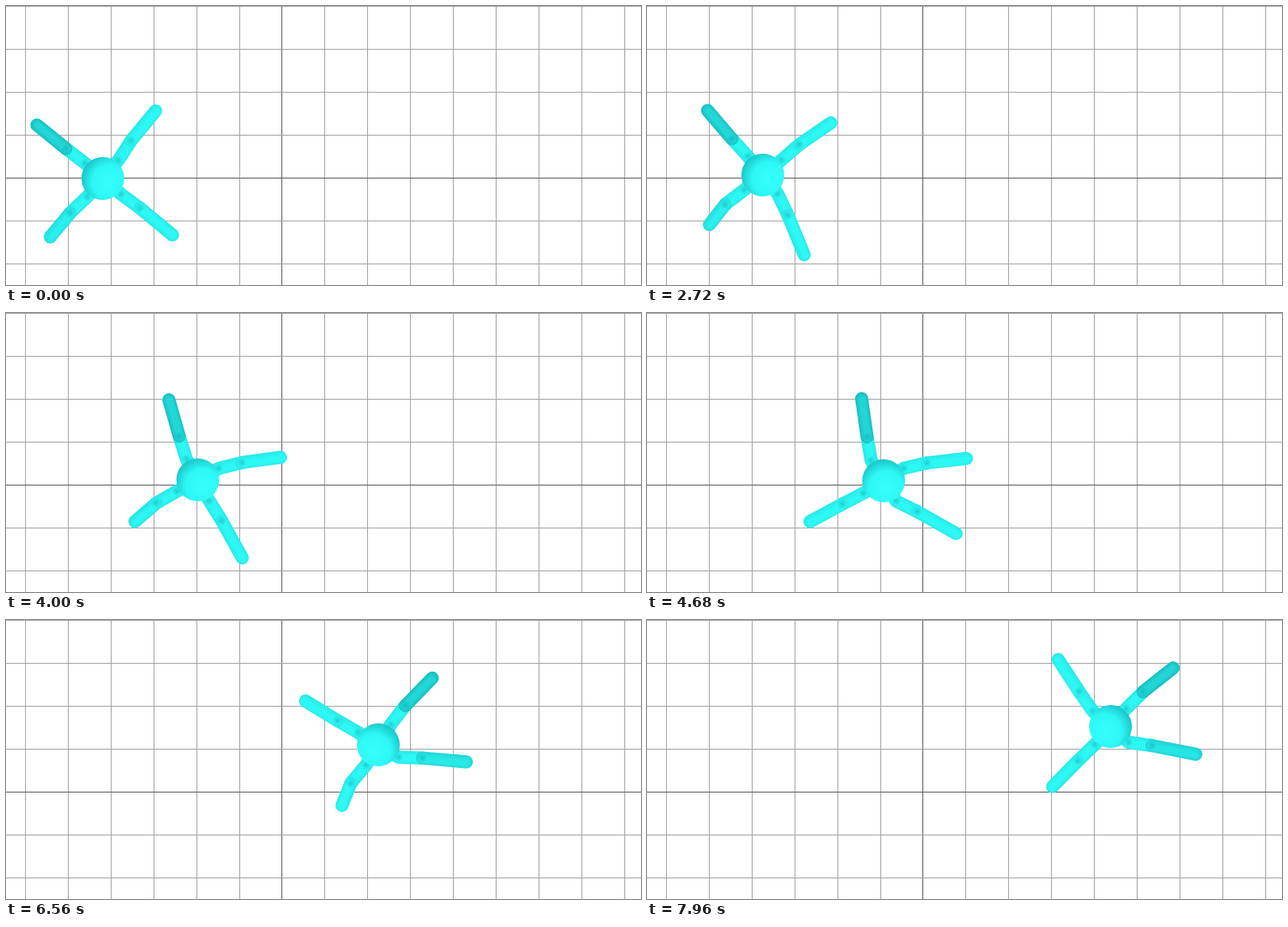
An HTML page that plays this animation: 800 px wide and 351 px high, repeating every 8000 ms.

```html
<!DOCTYPE html>
<html lang="en">
<head>
<meta charset="utf-8">
<title>Walking ant</title>
<style>
html, body { margin: 0; width: 100%; height: 100%; overflow: hidden; background: #fff; }
svg { display: block; width: 100%; height: 100%; }
polyline { fill: none; stroke-linecap: round; stroke-linejoin: round; }
</style>
</head>
<body>
<svg viewBox="0 0 800 351">
  <defs>
    <radialGradient id="ball" r=".72">
      <stop offset="0" stop-color="#32fffb"/>
      <stop offset=".55" stop-color="#2ef8f5"/>
      <stop offset="1" stop-color="#17bcbe"/>
    </radialGradient>
    <radialGradient id="dent">
      <stop offset="0" stop-color="#0ca6aa" stop-opacity=".5"/>
      <stop offset="1" stop-color="#0ca6aa" stop-opacity="0"/>
    </radialGradient>
  </defs>
  <g id="grid" shape-rendering="crispEdges"></g>
  <g id="legs"></g>
  <circle id="torso" r="27" fill="url(#ball)"/>
</svg>
<script>
const LOOP = 8000, HIP = 30, THIGH = 30, RAD = Math.PI / 180;
const LAMP = { x: 340, y: 330 };

// Key poses: body position, leg headings in degrees, reach of the rear left leg
const poses = [
  { t: 2080, x: 122, y: 217, head: [219, 308, 39, 132], reach: 99 },
  { t: 3320, x: 188, y: 208, head: [243, 340, 36, 144], reach: 86 },
  { t: 4680, x: 298, y: 211, head: [255, 345, 36, 151], reach: 106 },
  { t: 5680, x: 368, y: 197, head: [260, 342, 43, 175], reach: 108 },
  { t: 6560, x: 469, y: 157, head: [211, 309, 11, 121], reach: 89 },
  { t: 7960, x: 584, y: 134, head: [232, 317, 18, 134], reach: 105 }
].map(p => ({ t: p.t, v: [p.x, p.y, p.reach, ...p.head] }));

const byId = id => document.getElementById(id);
function set(el, attrs) {
  for (const key in attrs) el.setAttribute(key, attrs[key]);
}
function add(parent, name, attrs) {
  const el = document.createElementNS('http://www.w3.org/2000/svg', name);
  set(el, attrs);
  return parent.appendChild(el);
}

function gridLine(x, y, width, height, axis) {
  add(byId('grid'), 'rect', { x, y, width, height, fill: axis ? '#555' : '#a0a0a0' });
}
for (let i = 0; i < 15; i++) gridLine(Math.floor(24.69 + 53.88 * i), 0, 1, 351, i === 6);
for (let i = 0; i < 7; i++) gridLine(0, 54 * i, 800, 1, i === 4);

// Limb layers: stroke width and shift towards the lamp
const layers = [{ width: 16.5, shift: 0 }, { width: 12.5, shift: .9 }, { width: 8, shift: 1.6 }];
const limb = g => layers.map(l => add(g, 'polyline', { 'stroke-width': l.width }));
const legs = [
  { base: 225, reach: 107, bend: -1 },
  { base: 315, reach: 108, bend: -4 },
  { base: 45, reach: 113, bend: -2 },
  { base: 135 }
].map(leg => {
  const g = add(byId('legs'), 'g', {});
  return {
    ...leg, upper: limb(g), lower: limb(g),
    dents: [6, 6].map(r => add(g, 'circle', { r, fill: 'url(#dent)' }))
  };
});

function slope(i, k) {
  if (i === 0) return 0;
  const a = poses[i - 1], b = poses[Math.min(i + 1, poses.length - 1)];
  return (b.v[k] - a.v[k]) / (b.t - a.t);
}

// Smooth curve through the key poses
function poseAt(time) {
  const t = Math.min(Math.max(time, poses[0].t), poses[poses.length - 1].t);
  const i = Math.max(1, poses.findIndex(p => p.t >= t)) - 1;
  const a = poses[i], b = poses[i + 1], d = b.t - a.t, u = (t - a.t) / d;
  const s = u * u * (3 - 2 * u), inA = u * (1 - u) ** 2, inB = u * u * (u - 1);
  const [x, y, reach, ...head] = a.v.map((p, k) =>
    p + (b.v[k] - p) * s + d * (inA * slope(i, k) + inB * slope(i + 1, k)));
  head[2] += 25 * Math.sin(Math.PI * u) ** 2; // the rear right leg kicks once per stride
  return { x, y, reach, head };
}

function tone(dark, layer) {
  const n = dark * (1 - layer * .1) + (2 - layer) * .06;
  const mix = (from, to) => Math.round(from + (to - from) * n);
  return `rgb(${mix(48, 14)},${mix(254, 160)},${mix(250, 164)})`;
}

function paint(lines, points, dark, lx, ly) {
  lines.forEach((line, i) => {
    const { shift } = layers[i];
    set(line, {
      points: points.map(([x, y]) => `${(x + lx * shift).toFixed(2)},${(y + ly * shift).toFixed(2)}`).join(' '),
      stroke: tone(dark, i)
    });
  });
}

const step = ([x, y], angle, len) => [x + Math.cos(angle * RAD) * len, y + Math.sin(angle * RAD) * len];

function draw(time) {
  const { x, y, reach, head } = poseAt(time);
  const yaw = legs.reduce((sum, leg, i) => sum + head[i] - leg.base, 0) * .2;
  const far = Math.hypot(LAMP.x - x, LAMP.y - y);
  const lx = (LAMP.x - x) / far, ly = (LAMP.y - y) / far;

  legs.forEach((leg, i) => {
    const hip = step([x, y], leg.base + yaw, HIP);
    const foot = step([x, y], head[i], leg.reach || reach);
    const bend = leg.bend || (107 - reach) / 2;
    const aim = Math.atan2(foot[1] - hip[1], foot[0] - hip[0]) / RAD;
    const knee = step(hip, aim + bend, THIGH);
    const away = -Math.cos(head[i] * RAD) * lx - Math.sin(head[i] * RAD) * ly;
    paint(leg.upper, [[x, y], hip, knee], .08, lx, ly);
    paint(leg.lower, [knee, foot], .08 + .45 * Math.max(0, away), lx, ly);
    [hip, knee].forEach(([cx, cy], j) => set(leg.dents[j], { cx, cy }));
  });
  set(byId('torso'), { cx: x, cy: y });
  set(byId('ball'), { cx: .5 + .18 * lx, cy: .5 + .18 * ly });
}

const start = performance.now();
function tick() {
  draw((performance.now() - start) % LOOP);
  requestAnimationFrame(tick);
}
tick();
</script>
</body>
</html>
```
